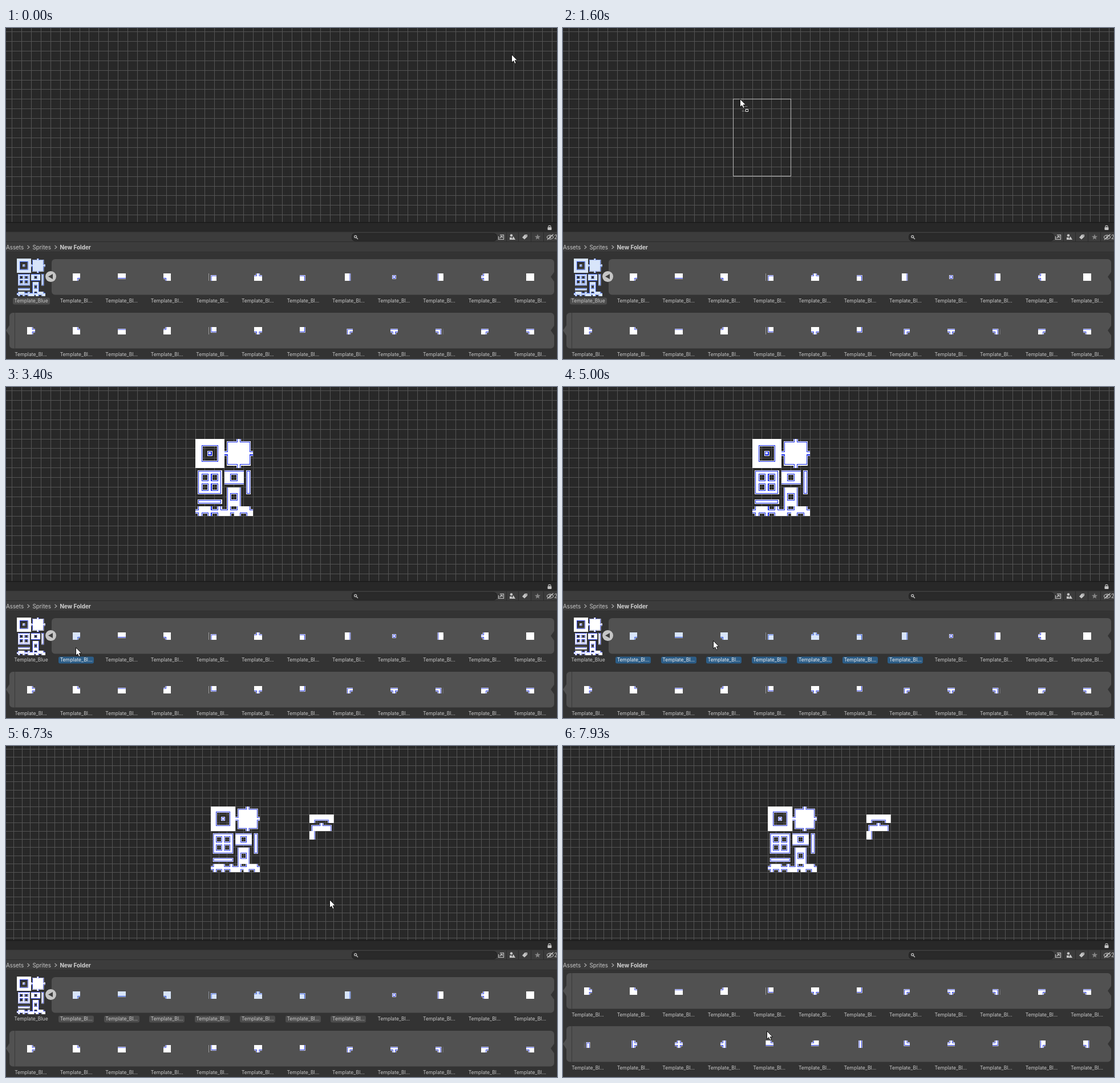
Animation, 966 px wide and 580 px high, one loop 8 s. Source, as an HTML page with a canvas:

```html
<!DOCTYPE html>
<html lang="en">
<head>
<meta charset="utf-8">
<title>Tile palette</title>
<style>
  html, body { margin: 0; width: 100%; height: 100%; overflow: hidden; background: #282828; }
  canvas { display: block; width: 966px; height: 580px; }
</style>
</head>
<body>
<canvas id="stage" width="966" height="580"></canvas>
<script>
const ctx = document.getElementById('stage').getContext('2d');
const LOOP = 8000, CELL = 16.916, ORIGIN = [332, 91], FONT = 'Inter, Roboto, sans-serif';
const SHEET_W = 96, SHEET_H = 128, INK = '#c4c4c4';

function newCanvas() {
  const c = document.createElement('canvas');
  c.width = SHEET_W;
  c.height = SHEET_H;
  return c;
}

// Solid areas of the tile sheet: open ends are 8 wide, borders sit 4 inside a tile.
function makeMask() {
  const g = newCanvas().getContext('2d', { willReadFrequently: true });
  const fill = (x, y, w, h) => g.fillRect(x, y, w, h);
  const cut = (cx, cy, size = 8) => g.clearRect(cx - size / 2, cy - size / 2, size, size);

  fill(0, 0, 48, 48);          // room with an island
  cut(24, 24, 24);
  fill(20, 20, 8, 8);

  fill(52, 4, 40, 40);         // block with four exits
  fill(68, 0, 8, 48);
  fill(48, 20, 48, 8);

  fill(4, 52, 40, 40);         // window
  for (const x of [16, 32]) for (const y of [64, 80]) cut(x, y);

  fill(48, 52, 32, 24);        // wide and tall ring
  cut(64, 64);
  fill(52, 80, 24, 32);
  cut(64, 96);

  fill(84, 52, 8, 40);         // bars
  fill(4, 100, 40, 8);

  fill(0, 112, 96, 16);        // crossings
  for (const x of [0, 32, 48, 64, 96]) g.clearRect(x - 4, 112, 8, 4);
  for (const x of [0, 16, 32, 80]) cut(x, 128);
  g.clearRect(60, 124, 4, 4);
  return g.getImageData(0, 0, SHEET_W, SHEET_H).data;
}
const mask = makeMask();

// Distance to the open area, up to 3, without leaving the tile.
function depth(x, y) {
  const keep = (v, base) => Math.min(Math.max(v, base), base + 15);
  for (let r = 0; r < 3; r++)
    for (let dy = -r; dy <= r; dy++)
      for (let dx = -r; dx <= r; dx++) {
        const nx = keep(x + dx, x & ~15), ny = keep(y + dy, y & ~15);
        if (!mask[(ny * SHEET_W + nx) * 4 + 3]) return r;
      }
  return 3;
}

function makeSheet(body, edge) {
  const sheet = newCanvas(), g = sheet.getContext('2d');
  for (let y = 0; y < SHEET_H; y++)
    for (let x = 0; x < SHEET_W; x++) {
      const d = depth(x, y);
      if (!d) continue;
      g.fillStyle = d === 2 ? edge : body;
      g.fillRect(x, y, 1, 1);
    }
  return sheet;
}
const plain = makeSheet('#ffffff', '#1226e6');
const tinted = makeSheet('#d8e5fa', '#1f48dc');

// Pointer moves: from, until, x, y, easing
const easeOut = u => 1 - (1 - u) ** 2;
const easeInOut = u => u * u * (3 - 2 * u);
const MOVES = [
  [0, 867, 24, 445],
  [930, 1892, 339, 93, easeOut],
  [2200, 3067, 108, 458],
  [3335, 3400, 122, 457],
  [3400, 4200, 633, 428],
  [4430, 5000, 263, 445],
  [5000, 5500, 573, 140],
  [5500, 5860, 541, 123],
  [6133, 6400, 512, 191],
  [6533, 6933, 622, 349],
  [6940, 7400, 132, 447],
  [7400, 7867, 357, 500]
];

function pointerAt(t) {
  let x = 886, y = 47;
  for (const [from, until, toX, toY, ease = easeInOut] of MOVES) {
    if (t <= from) break;
    const k = ease(Math.min(1, (t - from) / (until - from)));
    x += (toX - x) * k;
    y += (toY - y) * k;
  }
  return [Math.round(x), Math.round(y)];
}

function box(x, y, w, h, fill, r = 0) {
  ctx.fillStyle = fill;
  ctx.beginPath();
  ctx.roundRect(x, y, w, h, r);
  ctx.fill();
}

function poly(points, fill, stroke) {
  ctx.beginPath();
  points.forEach(([x, y]) => ctx.lineTo(x, y));
  ctx.closePath();
  ctx.fillStyle = fill;
  ctx.fill();
  if (stroke) { ctx.strokeStyle = stroke; ctx.lineWidth = 1; ctx.stroke(); }
}

function line(points, color, width = 1) {
  ctx.beginPath();
  points.forEach(([x, y]) => ctx.lineTo(x, y));
  ctx.strokeStyle = color;
  ctx.lineWidth = width;
  ctx.stroke();
}

function disc(x, y, r, fill) {
  ctx.beginPath();
  ctx.arc(x, y, r, 0, 7);
  ctx.fillStyle = fill;
  ctx.fill();
}

function ring(x, y, rx, ry, width = 1.2, from = 0) {
  ctx.beginPath();
  ctx.ellipse(x, y, rx, ry, 0, from, Math.PI * 2);
  ctx.strokeStyle = INK;
  ctx.lineWidth = width;
  ctx.stroke();
}

function text(str, x, y, size, color = '#c8c8c8', weight = 400, align = 'left') {
  ctx.font = `${weight} ${size}px ${FONT}`;
  ctx.textAlign = align;
  ctx.fillStyle = color;
  ctx.fillText(str, x, y);
}

function drawTile(sheet, n, x, y, size) {
  ctx.drawImage(sheet, n % 6 * 16, Math.floor(n / 6) * 16, 16, 16, x, y, size, size);
}

const draggingSheet = t => t > 1000 && t < 2130;
const draggingTiles = t => t > 5070 && t < 5860;

function drawScene(t, pointer) {
  const zoom = t < 6460 ? 1 : 0.85, step = CELL * zoom;
  const left = ORIGIN[0] * zoom + 512 * (1 - zoom), top = ORIGIN[1] * zoom + 191 * (1 - zoom);
  ctx.save();
  ctx.beginPath();
  ctx.rect(0, 0, 966, 340);
  ctx.clip();
  box(0, 0, 966, 340, '#282828');
  ctx.fillStyle = '#545454';
  for (let i = -30; i < 50; i++) {
    ctx.fillRect(Math.floor(left + i * step), 0, 1, 340);
    ctx.fillRect(0, Math.floor(top + i * step), 966, 1);
  }

  ctx.imageSmoothingEnabled = zoom < 1;
  if (t >= 2130) ctx.drawImage(plain, left, top, 6 * step, 8 * step);
  if (t >= 5860)
    for (let n = 0; n < 7; n++)
      drawTile(plain, n, left + (12 + n % 3) * step, top + (1 + Math.floor(n / 3)) * step, step);

  if (draggingSheet(t) || draggingTiles(t)) {
    const [x, y] = pointer.map((v, k) =>
      Math.floor(ORIGIN[k] + Math.floor((v - ORIGIN[k]) / CELL) * CELL) + 0.5);
    const [cols, rows] = draggingSheet(t) ? [6, 8] : [3, 3];
    ctx.strokeStyle = '#b4b4b4';
    ctx.strokeRect(x, y, Math.round(CELL * cols), Math.round(CELL * rows));
  }
  ctx.restore();
}

function label(str, cx, y, state) {
  if (state) {
    const w = str.endsWith('.') ? 62 : 65;
    box(Math.round(cx - w / 2), y - 8.5, w, 12, state === 'on' ? '#2c5d87' : '#4d4d4d', 3);
  }
  text(str, cx, y, 8.6, state === 'on' ? '#f0f0f0' : '#c8c8c8', 400, 'center');
}

function drawAssets(t) {
  const scroll = t < 7865 ? 0 : t < 7930 ? 50.6 : 101.2;
  const sheetOn = t < 3200;
  const count = sheetOn ? 0 : t < 4265 ? 1 : 7;
  const focused = sheetOn ? t >= 930 && t < 1260 : t < 5200;
  const state = focused ? 'on' : 'off';

  ctx.save();
  ctx.beginPath();
  ctx.rect(0, 393, 966, 187);
  ctx.clip();
  box(0, 393, 966, 187, '#333333');
  for (let row = 0; row < 3; row++) {
    const y = Math.round(405 + 93.8 * row - scroll), left = row ? 6 : 80, mid = y + 31;
    box(left, y, 961 - left, 62.5, '#515151', 6);
    poly([[961.5, mid - 9], [955, mid], [961.5, mid + 9]], '#333333');
    if (row) {
      poly([[6, mid - 9], [0, mid], [6, mid + 9]], '#515151');
      box(15, y, 1, 62.5, '#3a3a3a');
    }
    for (let col = row ? 0 : 1; col < 12; col++) {
      const n = row * 12 + col - 1, cx = 44 + 79.55 * col, on = n < count;
      drawTile(on ? tinted : plain, n, cx - 6.8, y + 24.5, 13.6);
      label('Template_Bl...', cx - 0.5, y + 76, on && state);
    }
  }
  const top = Math.round(405 - scroll);
  ctx.drawImage(sheetOn ? tinted : plain, 19, top - 1, 49.5, 66);
  label('Template_Blue', 44, top + 76, sheetOn && state);
  disc(78.5, top + 30.5, 9.5, '#c6c6c6');
  poly([[74, top + 30.5], [82, top + 26], [82, top + 35]], '#404040');
  ctx.restore();
}

function drawBars() {
  box(0, 340, 966, 1.5, '#191919');
  box(0, 341.5, 966, 16, '#282828');
  box(0, 357.5, 966, 36, '#3c3c3c');
  for (const y of [374, 392]) box(0, y, 966, 1, '#2b2b2b');
  for (const x of [877, 898, 920, 942]) box(x, 358, 1, 16, '#2b2b2b');

  // lock
  box(949.5, 349, 7, 5, INK, 1);
  ring(953, 348.5, 2.2, 2.2, 1.2, Math.PI);

  // search field
  box(606, 359.5, 255, 14, '#202020', 6);
  box(607, 360.5, 253, 12, '#2a2a2a', 5);
  ring(612.7, 365.6, 2, 2);
  line([[614.2, 367.2], [617, 370]], INK, 1.3);

  // open in window
  line([[866, 362.5], [872.5, 362.5], [872.5, 370.5], [863.5, 370.5], [863.5, 365]], INK, 1.2);
  line([[865.5, 368.5], [869.5, 364.5]], INK, 1.2);
  line([[866.5, 364.5], [870, 364.5], [870, 368]], INK, 1.2);

  // shapes
  disc(886, 363.5, 2.3, INK);
  poly([[889.5, 365], [893, 371], [886.5, 371]], INK);
  box(883, 367, 4, 4, INK);

  // tag
  poly([[905, 367], [909.5, 362], [914, 362], [914, 365.5], [909, 370.5]], INK);
  disc(912, 364, 0.8, '#3c3c3c');

  // star
  poly(Array.from({ length: 10 }, (_, i) => {
    const a = i * Math.PI / 5 - Math.PI / 2, r = i % 2 ? 2.3 : 5.4;
    return [932 + r * Math.cos(a), 366.5 + r * Math.sin(a)];
  }), '#858585');

  // hidden eye
  ring(954, 366.5, 5.5, 3.3);
  disc(954, 366.5, 1.7, INK);
  line([[949, 371], [959.5, 361.5]], INK, 1.3);
  text('2', 961, 370, 9.8);

  text('Assets', 0, 387.5, 9.8);
  text('Sprites', 46.5, 387.5, 9.8);
  text('New Folder', 94.5, 387.5, 9.9, '#d2d2d2', 700);
  for (const x of [37.5, 85.5]) line([[x, 381], [x + 3.5, 384], [x, 387]], '#b0b0b0', 1.1);
}

const ARROW = [[0, 0], [0, 14], [3.2, 11.2], [5.4, 16], [7.8, 15], [5.7, 10.3], [10, 10.3]];

function drawPointer(t, [x, y]) {
  ctx.save();
  ctx.translate(x + 0.5, y - 0.5);
  poly(ARROW, '#ffffff', '#101010');
  if ((draggingSheet(t) || draggingTiles(t)) && y < 340) {
    ctx.fillStyle = '#d0d0d0';
    for (let i = 0; i < 4; i++) {
      ctx.fillRect(5.5 + i * 2, 12.5, 1, 1);
      ctx.fillRect(3.5 + i * 2, 20.5, 1, 1);
    }
    box(9.5, 17.5, 6, 6, '#101010');
    ctx.strokeStyle = '#ffffff';
    ctx.lineWidth = 1;
    ctx.strokeRect(10, 18, 4, 4);
  }
  ctx.restore();
}

function draw(t) {
  const pointer = pointerAt(t);
  drawScene(t, pointer);
  drawAssets(t);
  drawBars();
  drawPointer(t, pointer);
}

// The picture advances at 15 steps per second.
const start = performance.now();
function tick(now) {
  const t = Math.max(0, now - start) % LOOP;
  draw(Math.floor((t + 4) * 0.015) / 0.015 % LOOP);
  requestAnimationFrame(tick);
}
draw(0);
requestAnimationFrame(tick);
</script>
</body>
</html>
```
